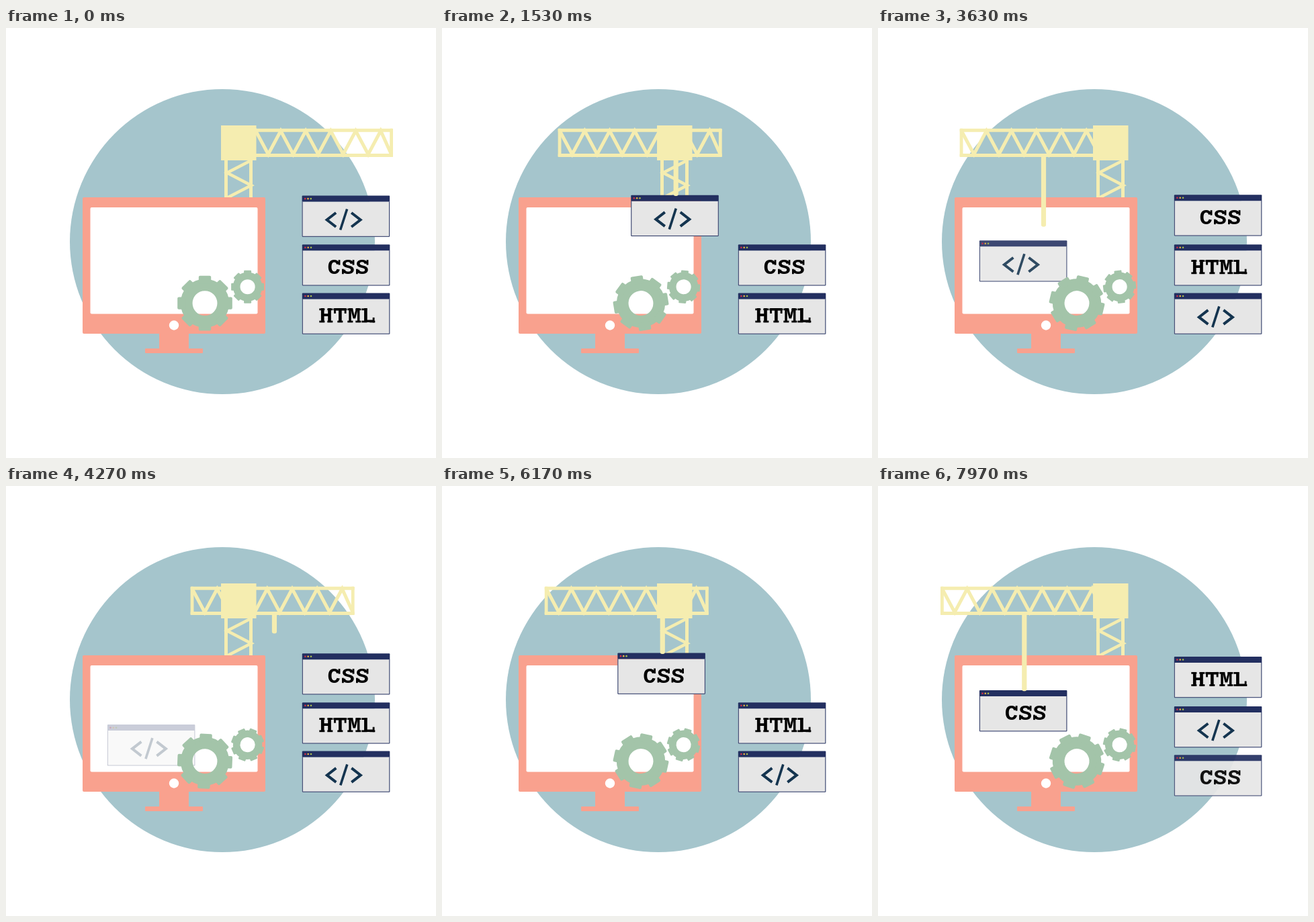
Recreate the animation shown at these times as an HTML page with a canvas. Size 640 by 640 pixels, loop 8000 ms.

```html
<!DOCTYPE html>
<html lang="en">
<head>
<meta charset="utf-8">
<title>Building a web page</title>
<style>
  html, body { margin: 0; width: 100%; height: 100%; overflow: hidden; background: #fff; }
  canvas { display: block; width: 640px; height: 640px; }
</style>
</head>
<body>
<canvas id="stage"></canvas>
<script>
const LOOP = 8000, FPS = 30, STEP = 40, CYCLE = 113;
// Steps within a cycle at which each action begins.
const LIFT = 14, PARKED = 50, LOWER = 63, RELEASE = 88;
const TRAVEL = 239, TROLLEY = 50.7, STACK_X = 440.8;
const COLOR = {
  disc: '#a5c5cc', crane: '#f5edb0', monitor: '#f9a18e', gear: '#a3c4a9',
  navy: '#232f60', page: '#e6e6e6', code: '#14344f'
};
const LABELS = ['</>', 'CSS', 'HTML'];

// Corners of each letter that carry a slab foot or an upright tick.
const FEET = { H: 'nw ne sw se', M: 'nw ne sw se', T: 'nw ne s', L: 'nw sw se' };
const TICKS = { T: 'nw ne', L: 'se', C: 'ne', S: 'ne sw' };

const canvas = document.getElementById('stage');
const ctx = canvas.getContext('2d');
const ratio = window.devicePixelRatio || 1;
canvas.width = canvas.height = 640 * ratio;

const clamp = v => Math.max(0, Math.min(1, v));
const span = (v, from, to) => clamp((v - from) / (to - from));
const mix = (a, b, k) => a + (b - a) * k;
const slotY = i => i ? 250 + 72.2 * i : 248;

function box(x, y, w, h, color, radius = 0) {
  ctx.fillStyle = color;
  ctx.beginPath();
  ctx.roundRect(x, y, w, h, radius);
  ctx.fill();
}

function dot(x, y, r, color) {
  ctx.fillStyle = color;
  ctx.beginPath();
  ctx.arc(x, y, r, 0, Math.PI * 2);
  ctx.fill();
}

function line(points, width, color) {
  ctx.strokeStyle = color;
  ctx.lineWidth = width;
  ctx.beginPath();
  points.forEach(([x, y]) => ctx.lineTo(x, y));
  ctx.stroke();
}

function drawMast() {
  box(325, 190, 5, 64, COLOR.crane);
  box(362, 190, 5, 64, COLOR.crane);
  const brace = Array.from({ length: 4 }, (_, i) => [i % 2 ? 329 : 365, 197 + i * 18.6]);
  line(brace, 4.5, COLOR.crane);
}

function drawMonitor() {
  box(114, 252, 272, 203, COLOR.monitor, 2);
  box(228, 454, 44, 24, COLOR.monitor);
  box(207, 477, 86, 7, COLOR.monitor, 1);
  box(125.5, 267, 249, 158.5, '#fff', 2);
  dot(250, 442.5, 7.2, '#fff');
}

function drawGear(x, y, scale, degrees) {
  ctx.save();
  ctx.translate(x, y);
  ctx.scale(scale, scale);
  ctx.rotate(degrees * Math.PI / 180);
  ctx.strokeStyle = COLOR.gear;
  ctx.lineWidth = 17.7;
  ctx.beginPath();
  ctx.arc(0, 0, 27.3, 0, Math.PI * 2);
  ctx.stroke();
  for (let i = 0; i < 8; i++) {
    box(-9.2, -40.8, 18.4, 12, COLOR.gear, 2);
    ctx.rotate(Math.PI / 4);
  }
  ctx.restore();
}

// Bars of the given size, tucked into the named corners of a letter.
function drawSerifs(corners = '', x, reach, w, h) {
  for (const corner of corners.split(' ').filter(Boolean)) {
    const side = corner.includes('w') ? -1 : corner.includes('e') ? 1 : 0;
    ctx.fillRect(x + side * reach - w / 2, corner[0] === 'n' ? 23 : 44 - h, w, h);
  }
}

function drawWord(word, center) {
  ctx.fillStyle = '#000';
  ctx.font = 'bold 32px "Liberation Mono", monospace';
  ctx.textAlign = 'center';
  [...word].forEach((letter, i) => {
    const x = center + (i - (word.length - 1) / 2) * 21;
    ctx.fillText(letter, x, 44);
    drawSerifs(FEET[letter], x, 6, 8, 2.8);
    drawSerifs(TICKS[letter], x, 7.8, 2.8, 7.5);
  });
}

function drawCard(label, x, y, alpha = 1) {
  ctx.save();
  ctx.globalAlpha = alpha;
  ctx.translate(x, y);
  box(0, 9, 130.5, 52, COLOR.page);
  box(0, 0, 130.5, 9, COLOR.navy, [1, 1, 0, 0]);
  line([[0.5, 9], [0.5, 60.8], [130, 60.8], [130, 9]], 1, COLOR.navy);
  ['#d42f4a', '#eeb440', '#a9bf50'].forEach((c, i) => dot(4.6 + i * 4.3, 4.6, 1.3, c));
  if (label === '</>') {
    for (const side of [-1, 1]) {
      const bracket = [-1, 0, 1].map(k => [62 + side * (k ? 11.5 : 25), 36 + k * 10.5]);
      line(bracket, 4, COLOR.code);
    }
    line([[67, 20], [57, 51]], 3.6, COLOR.code);
  } else {
    drawWord(label, label === 'CSS' ? 68.4 : 67);
  }
  ctx.restore();
}

function drawStack(cycle, s) {
  const rise = span(s, LOWER, RELEASE);
  for (let i = 1; i <= 3; i++) {
    const settle = i === 1 ? 1.5 * span(s, RELEASE, CYCLE) : 0;
    drawCard(LABELS[(cycle + i) % 3], STACK_X, mix(slotY(i), slotY(i - 1), rise) + settle,
      i === 3 ? rise : 1);
  }
}

function drawTruss(left) {
  for (const y of [149.7, 187]) box(left, y, 244, 5, COLOR.crane, 1);
  for (const x of [left, left + 239.2]) box(x, 149.7, 4.8, 42.3, COLOR.crane, 1);
  const zigzag = Array.from({ length: 14 }, (_, i) =>
    [left + Math.min(2.5 + i * 18.6, 241.5), i % 2 ? 188 : 153]);
  line(zigzag, 5, COLOR.crane);
}

function draw(time) {
  // The motion advances in 40 ms steps, shown at 30 frames per second.
  const shown = Math.floor((time + 4) * FPS / 1000) * 1000 / FPS;
  const step = Math.floor((shown + 15) / STEP);
  const cycle = Math.floor(step / CYCLE);
  const s = step % CYCLE;

  const out = span(s, LIFT, PARKED);
  const slide = TROLLEY * span(s, PARKED, LOWER);
  const back = span(s, RELEASE, CYCLE);
  const left = 332 - TRAVEL * (out - back);
  const cardX = STACK_X - 0.2 - TRAVEL * out - slide;
  const cardY = 249.5 - 1.3 * out + 2.43 * Math.max(0, s - LOWER);
  const hookEnd = s < LOWER
    ? mix(190, 250, span(s, 0, LIFT))
    : mix(mix(250, 310, span(s, LOWER, RELEASE)), 191, back);

  ctx.setTransform(ratio, 0, 0, ratio, 0, 0);
  ctx.fillStyle = '#fff';
  ctx.fillRect(0, 0, 640, 640);
  dot(322, 318, 227, COLOR.disc);
  drawMast();
  drawMonitor();
  drawStack(cycle, s);
  drawCard(LABELS[cycle % 3], cardX, cardY, 1 - back);

  const turn = step * 2.125;
  drawGear(296, 409.6, 1, turn);
  drawGear(359.6, 385.2, 0.6, -turn / 2);

  drawTruss(left);
  box(320, 145, 52.5, 52, COLOR.crane);
  if (hookEnd > 192) {
    box(left + 171.9 - slide, 188, 7.2, hookEnd - 188, COLOR.crane, [0, 0, 3, 3]);
  }
}

const start = performance.now();
function tick() {
  draw((performance.now() - start) % LOOP);
  requestAnimationFrame(tick);
}
tick();
</script>
</body>
</html>
```
